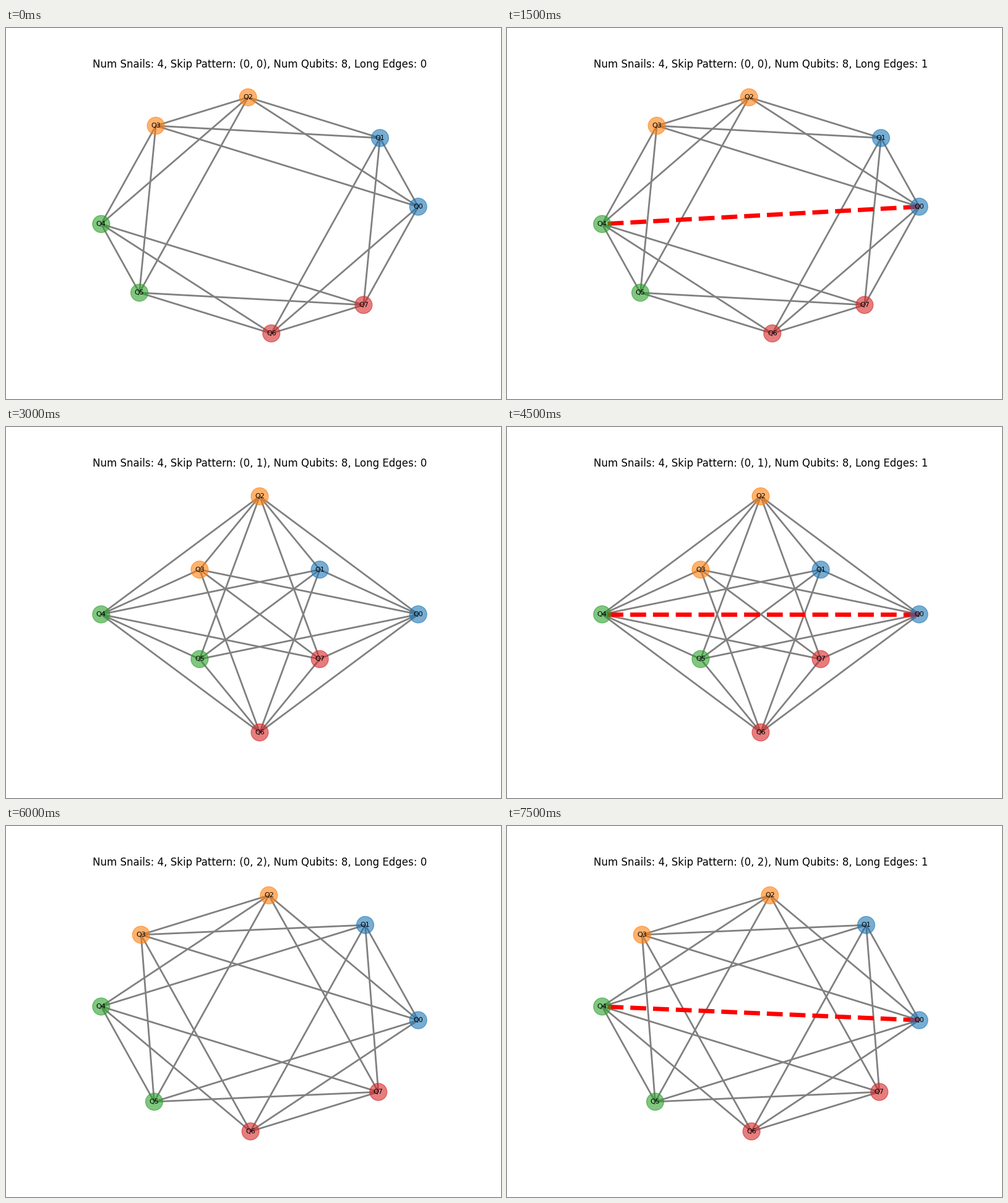
A matplotlib script that plays this animation: 800x600 px, repeating every 8000 ms.

```python
from itertools import combinations

import matplotlib.pyplot as plt
import numpy as np
from matplotlib.animation import FuncAnimation
from matplotlib.collections import LineCollection

SNAILS = 4
QUBITS = 2 * SNAILS
STEP_MS = 500
STEPS_PER_VIEW = 3

# First pair of qubits for each skip; the other pairs are quarter turns of it.
FIRST_PAIRS = [
    ((1, 0.0734), (0.759, 0.6552)),
    ((1, 0), (0.379, 0.379)),
    ((1, -0.0580), (0.6656, 0.7485)),
]


def layout(skip):
    pair = np.array(FIRST_PAIRS[skip])
    turn = np.array([[0, 1], [-1, 0]])
    return np.vstack([pair @ np.linalg.matrix_power(turn, k)
                      for k in range(SNAILS)])


def couplings(skip):
    """Every snail joins four qubits with each other."""
    edges = set()
    for k in range(SNAILS):
        members = [0, 2, 1 + 2 * skip, 3 + 4 * skip]
        ring = sorted((2 * k + m) % QUBITS for m in members)
        edges.update(combinations(ring, 2))
    return sorted(edges)


plt.rcParams["font.family"] = "DejaVu Sans"
fig, ax = plt.subplots(figsize=(8, 6), dpi=100)
ax.set(xlim=(-1.21, 1.21), ylim=(-1.21, 1.21))
ax.axis("off")
title = ax.set_title("", fontsize=12)

short_edges = LineCollection([], colors="gray", linewidths=2, zorder=1)
long_edge = LineCollection([], colors="red", linewidths=5,
                           linestyles="dashed", zorder=1)
ax.add_collection(short_edges, autolim=False)
ax.add_collection(long_edge, autolim=False)

start = layout(0)
nodes = ax.scatter(start[:, 0], start[:, 1], s=400, alpha=0.6, zorder=2,
                   c=[f"C{q // 2}" for q in range(QUBITS)])
labels = [ax.text(x, y, f"Q{q}", fontsize=8, ha="center", va="center")
          for q, (x, y) in enumerate(start)]
ax.set(xlim=(-1.21, 1.21), ylim=(-1.21, 1.21))


def draw(step):
    skip, extra = divmod(step // STEPS_PER_VIEW, 2)
    pos = layout(skip)
    short_edges.set_segments([pos[[a, b]] for a, b in couplings(skip)])
    long_edge.set_segments([pos[[0, QUBITS // 2]]] if extra else [])
    nodes.set_offsets(pos)
    for label, point in zip(labels, pos):
        label.set_position(point)
    title.set_text(f"Num Snails: {SNAILS}, Skip Pattern: (0, {skip}), "
                   f"Num Qubits: {QUBITS}, Long Edges: {extra}")
    return [short_edges, long_edge, nodes, title, *labels]


anim = FuncAnimation(fig, draw, frames=16, interval=STEP_MS,
                     init_func=lambda: draw(0), repeat=True, repeat_delay=0)
plt.show()
```
